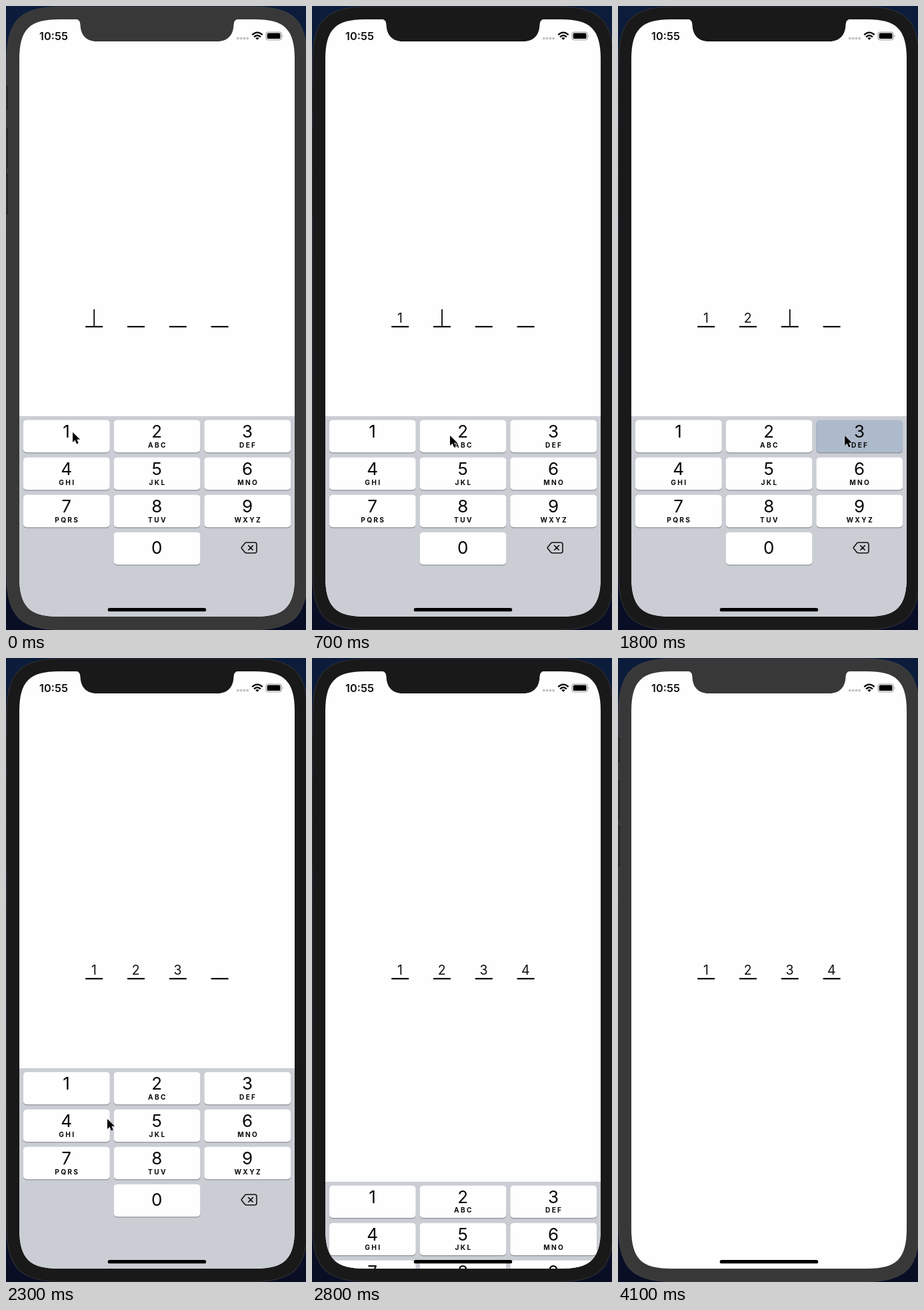
Animation, 450 px wide and 934 px high, one loop 5000 ms. Source, as an HTML page:

```html
<!DOCTYPE html>
<html lang="en">
<head>
<meta charset="utf-8">
<title>Passcode entry</title>
<style>
  html, body { margin: 0; width: 100%; height: 100%; overflow: hidden; background: #0a1530; }
  svg { display: block; width: 450px; height: 934px; font-family: Inter, Roboto, sans-serif; }
  text { text-anchor: middle; fill: #111; }
  .key { font-size: 26px; fill: #080808; }
  .sub { font-size: 10.2px; font-weight: 700; letter-spacing: 2.3px; fill: #080808; }
  .digit { font-size: 19.5px; }
</style>
</head>
<body>
<svg viewBox="0 0 450 934">
  <defs>
    <linearGradient id="desk" x2="0" y2="1">
      <stop offset="0" stop-color="#0c1c3b"/>
      <stop offset="1" stop-color="#090e25"/>
    </linearGradient>
    <clipPath id="clip"><path id="clipShape"/></clipPath>
  </defs>
  <rect width="450" height="934" fill="url(#desk)"/>
  <g id="buttons"></g>
  <path id="bezel" stroke-width="1.2"/>
  <g id="ridges"></g>
  <path id="screen" fill="#fefefe"/>
  <path id="notch" d="M104 19.5Q111.500 20 111.500 28C112 44 121 53 136 53H317C332 53 341 44 341.500 28Q341.500 20 349 19.500Z"/>

  <text x="71.500" y="50.600" font-size="16.300" font-weight="600">10:55</text>
  <g id="signal" fill="#c5c5c7"></g>
  <g fill="none" stroke="#000" stroke-width="2.300">
    <path d="M369.300 43.200Q377 36 384.700 43.200"/>
    <path d="M372.100 46.300Q377 41.700 381.900 46.300"/>
  </g>
  <path d="M374.400 48.200Q377 46 379.600 48.200L377 50.800Z"/>
  <rect x="390" y="39" width="23.200" height="11.700" rx="3.500" fill="none" stroke="#999" stroke-width="1.100"/>
  <rect x="391.700" y="40.600" width="19.800" height="8.500" rx="1.900"/>
  <path d="M414.600 43Q416.600 44.800 414.600 46.800Z" fill="#999"/>

  <g id="slots"></g>
  <rect id="caret" y="454" width="1.900" height="26" fill="#111"/>
  <g clip-path="url(#clip)">
    <g id="board">
      <rect x="20" y="614" width="413" height="310" fill="#cacdd4"/>
      <g id="keys"></g>
      <g fill="none" stroke="#111" stroke-width="1.600" stroke-linecap="round" stroke-linejoin="round">
        <path d="M360.600 803H373.200Q376 803 376 806V815.800Q376 818.800 373.200 818.800H360.600Q359.400 818.800 358.500 817.900L353.600 812Q352.700 811 353.600 809.900L358.500 803.900Q359.400 803 360.600 803Z"/>
        <path d="M363.700 807.600L370.300 814.200M370.300 807.600L363.700 814.200"/>
      </g>
    </g>
  </g>
  <rect x="152.700" y="901" width="147.500" height="5.300" rx="2.650"/>
  <path id="cursor" d="M0 0V15L3.500 11.800L6 17.400L8.700 16.200L6.300 10.800H11Z" stroke="#fff" stroke-width="1" stroke-linejoin="round" paint-order="stroke"/>
</svg>
<script>
const LOOP = 5000, STEP = 100;
const SLIDE = 2700, RATE = 19, TRAVEL = 300;
const el = id => document.getElementById(id);

function add(parent, tag, attrs, text) {
  const node = document.createElementNS('http://www.w3.org/2000/svg', tag);
  for (const k in attrs) node.setAttribute(k, attrs[k]);
  if (text) node.textContent = text;
  return parent.appendChild(node);
}

// Rectangle with smooth corners that reach e along each side.
function smooth(l, t, r, b, e) {
  const c = e * 0.25;
  return `M${l} ${t + e}C${l} ${t + c} ${l + c} ${t} ${l + e} ${t}` +
    `H${r - e}C${r - c} ${t} ${r} ${t + c} ${r} ${t + e}` +
    `V${b - e}C${r} ${b - c} ${r - c} ${b} ${r - e} ${b}` +
    `H${l + e}C${l + c} ${b} ${l} ${b - c} ${l} ${b - e}Z`;
}

el('bezel').setAttribute('d', smooth(1, 1, 452, 933.5, 82));
for (const id of ['screen', 'clipShape']) el(id).setAttribute('d', smooth(20, 20, 433, 914, 60));

for (const [y, h] of [[120, 34], [183, 59], [251, 60]]) {
  add(el('buttons'), 'rect', { x: 0, y, width: 1.5, height: h, fill: '#191919' });
  add(el('ridges'), 'path', { d: `M0 ${y + .5}H2V${y + h + .5}H0`, fill: 'none', stroke: '#141414', 'stroke-width': 1 });
}
for (let i = 0; i < 4; i++) add(el('signal'), 'circle', { cx: 347.8 + i * 4.8, cy: 48.6, r: 2 });

const slotX = i => 132.2 + i * 62.8;
const digits = [1, 2, 3, 4].map((n, i) => {
  add(el('slots'), 'rect', { x: slotX(i) - 13, y: 478.9, width: 26, height: 2.2, fill: '#0a0a0a' });
  return add(el('slots'), 'text', { class: 'digit', x: slotX(i) - .2, y: 474 }, n);
});

const keys = {};
const labels = ['', 'ABC', 'DEF', 'GHI', 'JKL', 'MNO', 'PQRS', 'TUV', 'WXYZ'];
function addKey(n, col, row, label) {
  const x = 26 + col * 135.7, y = 619.8 + row * 56, mid = x + 64.6, g = el('keys');
  add(g, 'rect', { x, y: y + 1.2, width: 129.7, height: 48.4, rx: 5, fill: '#8c8e93' });
  keys[n] = add(g, 'rect', { x, y, width: 129.7, height: 48.4, rx: 5 });
  add(g, 'text', { class: 'key', x: mid, y: row < 3 ? y + 26.2 : y + 32.4 }, n);
  if (label) add(g, 'text', { class: 'sub', x: mid + 1.2, y: y + 40.8 }, label);
}
labels.forEach((s, i) => addKey(String(i + 1), i % 3, Math.floor(i / 3), s));
addKey('0', 1, 3);

// [digit, press time, release time]
const taps = [['1', 200, 400], ['2', 800, 1000], ['3', 1700, 1900], ['4', 2500, 2700]];

// [time, x, y]
const path = [
  [0, 100, 638], [400, 102, 638], [500, 128, 643], [600, 168, 647], [700, 207, 643],
  [800, 217, 642], [900, 219, 642], [1100, 219, 642], [1200, 254, 640], [1400, 328, 642],
  [1500, 340, 643], [1900, 340, 643], [2000, 328, 647], [2100, 284, 659], [2200, 214, 677],
  [2300, 152, 690], [2400, 123, 693], [2500, 115, 697], [2800, 115, 697]
];

function cursorAt(t) {
  const i = path.findIndex(p => p[0] > t);
  const [a, b] = [path[i - 1], path[i]];
  const u = (t - a[0]) / (b[0] - a[0]);
  return [a[1] + (b[1] - a[1]) * u, a[2] + (b[2] - a[2]) * u];
}

const show = (node, on) => node.setAttribute('visibility', on ? 'visible' : 'hidden');

function draw(t) {
  const active = t >= 100 && t < 4100;
  const body = active ? '#191919' : '#383838';
  el('bezel').setAttribute('fill', body);
  el('bezel').setAttribute('stroke', active ? '#303034' : '#414143');
  el('notch').setAttribute('fill', body);
  el('ridges').setAttribute('opacity', active ? .6 : 1);

  for (const n in keys) keys[n].setAttribute('fill', '#fefefe');
  taps.forEach(([n, down, up], i) => {
    if (t >= down && t < up) keys[n].setAttribute('fill', '#adbacb');
    show(digits[i], t >= up);
  });

  const typed = taps.filter(k => t >= k[2]).length;
  const since = (t - (typed ? taps[typed - 1][2] : 0)) % 1000;
  show(el('caret'), typed < 4 && (since < 400 || since >= 700));
  el('caret').setAttribute('x', slotX(typed) - .95);

  const s = Math.max(0, t - SLIDE) / 1000 * RATE;
  const drop = TRAVEL * (1 - (1 + s) * Math.exp(-s));
  el('board').setAttribute('transform', `translate(0 ${drop.toFixed(2)})`);
  show(el('board'), t < 3200);

  const pointing = t < 2800;
  show(el('cursor'), pointing);
  if (pointing) el('cursor').setAttribute('transform', `translate(${cursorAt(t).join(' ')})`);
}

const start = performance.now();
function tick() {
  const t = (performance.now() - start) % LOOP;
  draw(Math.floor(t / STEP) * STEP);
  requestAnimationFrame(tick);
}
tick();
</script>
</body>
</html>
```
